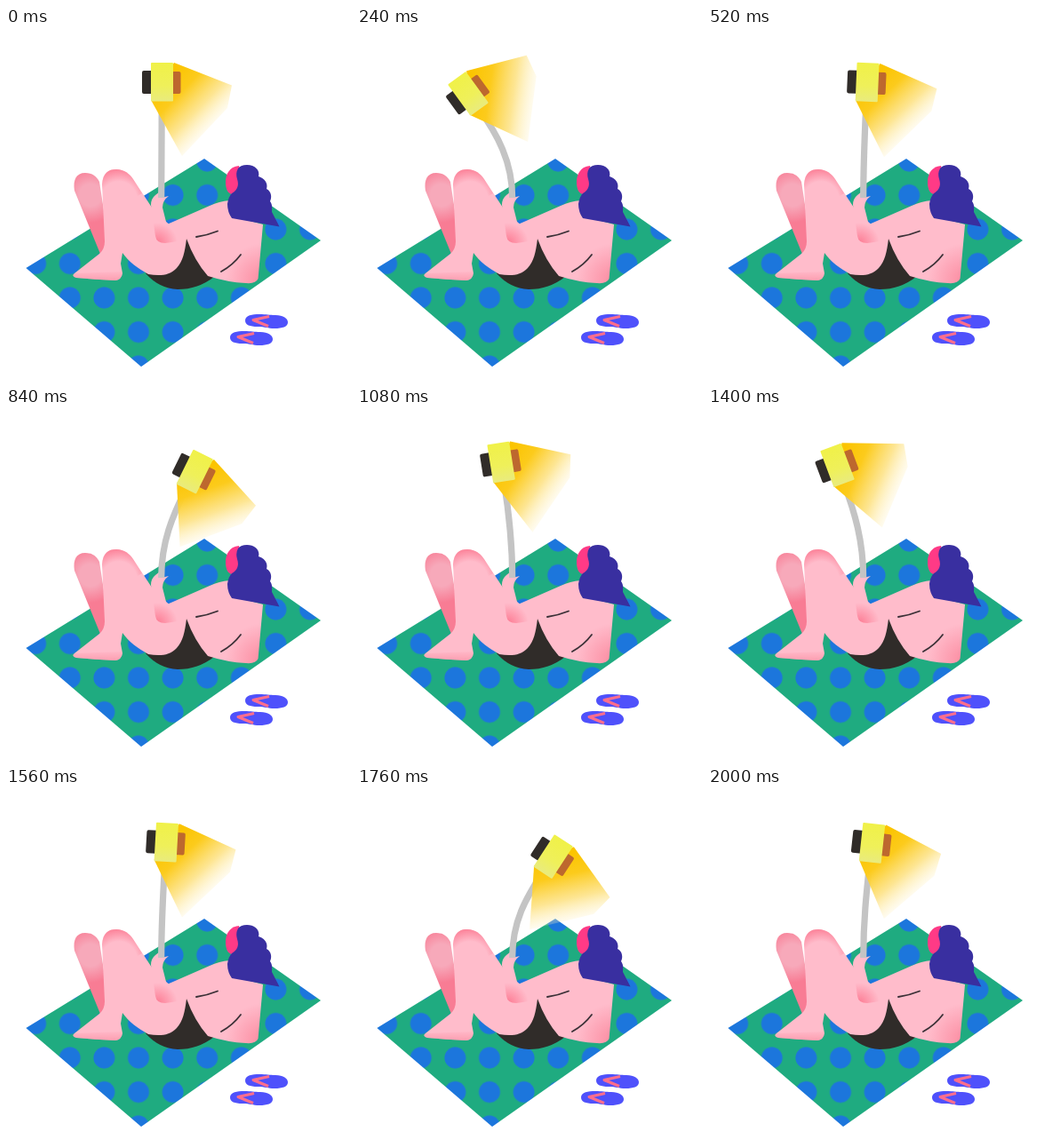
An HTML page that plays this animation: 388x396 px, repeating every 2040 ms.

```html
<!DOCTYPE html>
<html lang="en">
<head>
<meta charset="utf-8">
<title>Sunbather</title>
<style>
  html, body { margin: 0; width: 100%; height: 100%; overflow: hidden; background: #fff; }
  svg { display: block; }
  .skin { fill: #ffbccb; }
  .dark { fill: #302c29; }
  .line { fill: none; stroke: #3a3036; stroke-width: 1.8; stroke-linecap: round; }
</style>
</head>
<body>
<svg width="388" height="396" viewBox="0 0 388 396">
  <defs>
    <pattern id="dots" x="129.7" y="322.8" width="38.6" height="38.5" patternUnits="userSpaceOnUse">
      <rect width="39" height="39" fill="#1fab80"/>
      <circle cx="19.3" cy="19.25" r="12" fill="#1c76dc"/>
    </pattern>
    <linearGradient id="beam" gradientUnits="userSpaceOnUse" x1="182" y1="54" x2="238" y2="108">
      <stop offset="0" stop-color="#fbc400"/>
      <stop offset=".3" stop-color="#fccb1c"/>
      <stop offset=".65" stop-color="#fde180" stop-opacity=".85"/>
      <stop offset="1" stop-color="#fff3c8" stop-opacity=".15"/>
    </linearGradient>
    <linearGradient id="phone" x1="0" y1="0" x2="0" y2="1">
      <stop offset="0" stop-color="#f0f148"/>
      <stop offset=".6" stop-color="#eff05a"/>
      <stop offset="1" stop-color="#e9eb7e"/>
    </linearGradient>
    <radialGradient id="backKnee" gradientUnits="userSpaceOnUse" cx="95" cy="188" r="31">
      <stop offset=".4" stop-color="#f7a9ba"/>
      <stop offset="1" stop-color="#f87c94"/>
    </radialGradient>
    <radialGradient id="frontKnee" gradientUnits="userSpaceOnUse" cx="127" cy="193" r="37">
      <stop offset=".55" stop-color="#fb7890" stop-opacity="0"/>
      <stop offset="1" stop-color="#fb7890"/>
    </radialGradient>
    <radialGradient id="elbow" gradientUnits="userSpaceOnUse" cx="170" cy="242" r="23">
      <stop offset="0" stop-color="#fd7b93"/>
      <stop offset="1" stop-color="#ffbccb"/>
    </radialGradient>
    <radialGradient id="back" gradientUnits="userSpaceOnUse" cx="289" cy="284" r="42">
      <stop offset="0" stop-color="#fc8ba0"/>
      <stop offset="1" stop-color="#ffbccb"/>
    </radialGradient>
    <linearGradient id="foot" gradientUnits="userSpaceOnUse" x1="0" y1="272" x2="0" y2="284">
      <stop offset="0" stop-color="#fc8ba0" stop-opacity="0"/>
      <stop offset="1" stop-color="#fc8ba0" stop-opacity=".6"/>
    </linearGradient>
    <g id="sandal">
      <path d="M0 7 C0 1 8 0 16 0 C24 0 27 1 34 1 C43 1 48 5 48 9 C48 14 42 16 33 16 C25 16 23 14 14 14 C5 14 0 12 0 7Z" fill="#4f51fb"/>
      <path d="M27 2.5 L9 6.5 L26 13.5" fill="none" stroke="#ff6e8c" stroke-width="3" stroke-linejoin="round"/>
    </g>
  </defs>

  <path d="M223 147 L354 239 L152 381 L22.500 270Z" fill="url(#dots)"/>
  <use href="#sandal" x="269" y="322"/>
  <use href="#sandal" x="252" y="341"/>

  <path class="dark" d="M196 236 L204 237 L234 280 Q216 294 193 294 Q172 293 157 276Z"/>
  <path d="M77 183 C75 171 79 163 89 163 C97 163 102 167 105 173 L118 256 L106 254Z" fill="url(#backKnee)"/>
  <g id="leg">
    <path class="skin" id="legShape" d="M108 176 C109 163 115 159 124 159 C133 159 139 164 143 170 L168 208 L203 237 C201 253 199 262 192 270 C184 279 172 279 160 277 C148 270 138 263 131 253 L129 265 L131 276 Q130 283 123 284 Q100 283 79 281 Q73 279 77 276 L105 254 Q111 249 111 240Z"/>
    <use href="#legShape" style="fill:url(#frontKnee)" visibility="hidden"/>
    <path d="M108 176 C109 163 115 159 124 159 C133 159 139 164 143 170 L153 186 L140 193 L110 195Z" fill="url(#frontKnee)"/>
    <path d="M77 276 L131 274 Q131 283 123 284 Q100 283 79 281 Q73 279 77 276Z" fill="url(#foot)"/>
  </g>

  <path d="M203 237 Q212 262 227 279 Q249 286 270 287 Q281 288 283.500 282 L289 221 L252 211 L251 194 Q240 195 229 200 L181 221 L184 241Z" fill="url(#back)"/>
  <path d="M163 199 Q163 192 168 188 L173 184 L175 191 L183 189 Q176 194 176 202 L181 222 L215 208 L204 237 Q190 241 179 242 Q169 242 168 234Z" fill="url(#elbow)"/>
  <path class="line" d="M214 235 Q227 233 238 228.500"/>
  <path class="line" d="M242 274 Q255 267 264 255"/>

  <path d="M262 155 C251 156 247 165 247 173 C247 182 250 187 255 187 L266 178Z" fill="#ff3a86"/>
  <path d="M261 158 Q264 154 271 154 C280 154 286 160 284 167 C291 169 295 175 293 181 C299 184 299 191 297 195 C300 199 299 203 299 207 L307.500 223.500 L254 214 Q249 207 249 198 Q250 190 254 186 C261 182 262 176 260 170 Q258 163 261 158Z" fill="#392fa0"/>

  <path id="pole" fill="none" stroke="#c4c4c4" stroke-width="7.200"/>
  <g id="head">
    <path d="M189 39 L254 64.500 L249 90 L198 144 L163 81Z" fill="url(#beam)"/>
    <rect class="dark" x="153" y="48" width="14" height="26" rx="2"/>
    <rect x="184" y="49" width="12.500" height="25" rx="2" fill="#bd682e"/>
    <rect x="163" y="39" width="25" height="43.500" rx="1" fill="url(#phone)"/>
  </g>
</svg>
<script>
  const LOOP = 2040, STEP = 40;
  const PIVOT = { x: 170.5, y: 145 };
  // [time in ms, tilt in degrees], linear between points
  const swing = [[0, 0], [250, -37.5], [760, 38], [1280, -38.5], [1793, 38], [LOOP, 0]];
  const pole = document.getElementById('pole');
  const head = document.getElementById('head');

  function tiltAt(t) {
    const i = swing.findIndex(([time]) => time > t);
    const [t0, a0] = swing[i - 1], [t1, a1] = swing[i];
    return a0 + (a1 - a0) * (t - t0) / (t1 - t0);
  }

  function draw(t) {
    const tilt = tiltAt(t);
    const rad = tilt * Math.PI / 180;
    const sin = Math.sin(rad), cos = Math.cos(rad);
    // Maps a point of the upright phone to its tilted place
    const turn = (x, y) => {
      const dx = x - PIVOT.x, dy = y - PIVOT.y;
      return `${PIVOT.x + dx * cos - dy * sin} ${PIVOT.y + dx * sin + dy * cos}`;
    };
    head.setAttribute('transform', `rotate(${tilt} ${PIVOT.x} ${PIVOT.y})`);
    pole.setAttribute('d', `M174.7 191 C174.7 150 ${turn(175.2, 117)} ${turn(175.2, 81)}`);
  }

  const start = performance.now();
  function frame() {
    const t = (performance.now() - start) % LOOP;
    draw(Math.floor(t / STEP) * STEP);
    requestAnimationFrame(frame);
  }
  draw(0);
  requestAnimationFrame(frame);
</script>
</body>
</html>
```
